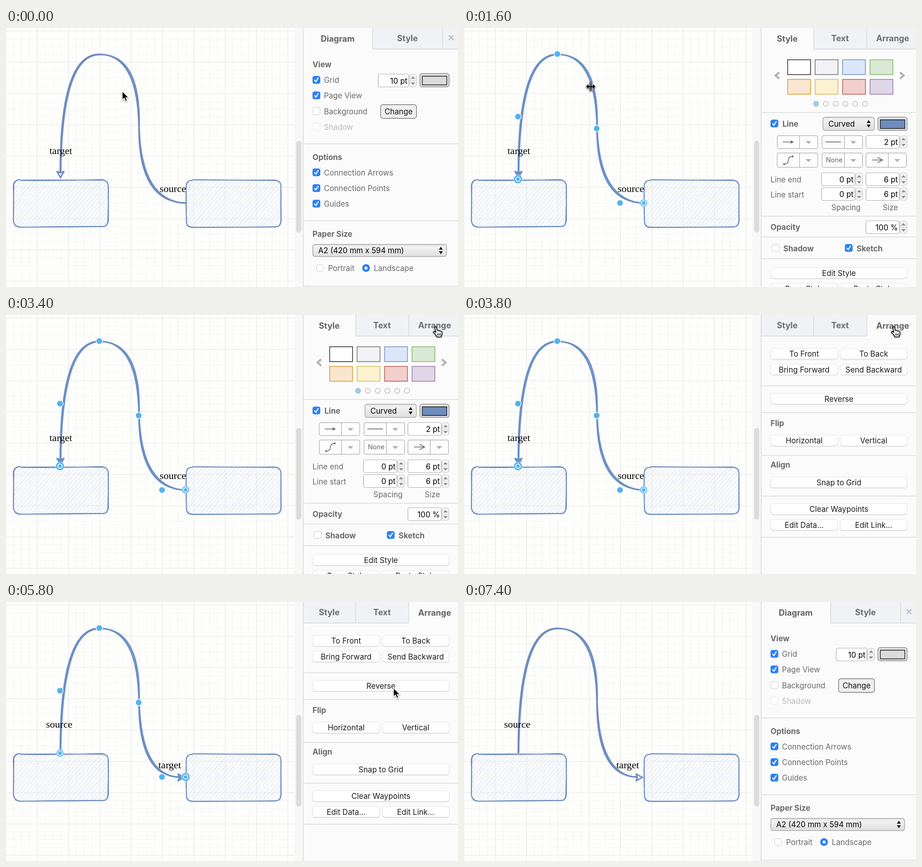
Recreate the animation shown at these times as an HTML page with a canvas. Size 988 px wide and 567 px high, loop 7800 ms.

```html
<!DOCTYPE html>
<html lang="en">
<head>
<meta charset="utf-8">
<title>Reversing a connector</title>
<style>
html, body { margin: 0; width: 100%; height: 100%; overflow: hidden; background: #fbfbfb; }
canvas { display: block; }
</style>
</head>
<body>
<canvas id="stage" width="988" height="567"></canvas>
<script>
const ctx = document.getElementById('stage').getContext('2d');
const LOOP = 7800, TICK = 200;
const SANS = 'Inter, "Noto Sans", sans-serif';
const SERIF = '"Liberation Serif", serif';
const EDGE = '#6e8dbf', HANDLE = '#54b2ee', BLUE = '#2c82f6';
const RULE = '#dadadb', GREY = '#696969';

// Times of the hard changes
const SELECT = 1400, STYLE = 1600, ARRANGE = 3800, REVERSE = 5800, DESELECT = 7400;

// Cursor stops: time, x, y
const STOPS = [[0, 254, 138], [200, 254, 138], [1000, 277, 128], [2400, 277, 128],
  [3400, 943, 27], [4000, 943, 27], [5200, 847, 188], [6000, 847, 188], [7200, 480, 232]];

function random(seed) {
  return () => (seed = seed * 16807 % 2147483647) / 2147483647;
}

// ---------- drawing helpers ----------
function line(color, width, ...pts) {
  ctx.beginPath();
  pts.forEach(([x, y], i) => i ? ctx.lineTo(x, y) : ctx.moveTo(x, y));
  ctx.strokeStyle = color;
  ctx.lineWidth = width;
  ctx.stroke();
}

function shape(fill, stroke, width, pts) {
  ctx.beginPath();
  pts.forEach(([x, y]) => ctx.lineTo(x, y));
  ctx.closePath();
  paint(fill, stroke, width);
}

function paint(fill, stroke, width = 1.3) {
  if (fill) { ctx.fillStyle = fill; ctx.fill(); }
  if (stroke) { ctx.strokeStyle = stroke; ctx.lineWidth = width; ctx.stroke(); }
}

function box(x, y, w, h, r, fill, stroke, width) {
  ctx.beginPath();
  ctx.roundRect(x, y, w, h, r);
  paint(fill, stroke, width);
}

function dot(x, y, r, fill, stroke, width) {
  ctx.beginPath();
  ctx.arc(x, y, r, 0, 7);
  paint(fill, stroke, width);
}

function text(str, x, y, { color = GREY, size = 16.7, bold = false, align = 'left' } = {}) {
  ctx.font = `${bold ? 700 : 400} ${size}px ${SANS}`;
  ctx.textAlign = align;
  ctx.fillStyle = color;
  ctx.fillText(str, x, y + size * 0.363);
}

function serif(str, x, y) {
  ctx.font = `22px ${SERIF}`;
  ctx.textAlign = 'left';
  ctx.fillStyle = '#000';
  ctx.fillText(str, x, y);
}

const title = (str, x, y) => text(str, x, y, { bold: true, color: '#696969', size: 16.9 });
const rule = y => line(RULE, 1.6, [650, y], [988, y]);

// ---------- diagram ----------
function grid() {
  ctx.fillStyle = '#fefefd';
  ctx.fillRect(0, 0, 631, 567);
  const step = 68.5 / 4;
  for (const major of [false, true]) {
    const color = major ? '#ebebe9' : '#f7f7f5';
    for (let i = 0; i < 40; i++) {
      if ((i % 4 === 0) !== major) continue;
      const x = i * step - 0.3, y = 6.5 + (i - 4) * step;
      if (x < 630) line(color, 1.5, [x, 0], [x, 567]);
      line(color, 1.5, [0, y], [630, y]);
    }
  }
  ctx.fillStyle = '#f8f8f9';
  ctx.fillRect(630, 0, 19, 567);
  box(634, 247, 11.5, 201, 5.7, '#dddcdd');
}

function sketchBox(x, y, w, h, seed) {
  const rnd = random(seed), jit = n => (rnd() - 0.5) * n;
  // hatching
  const lean = 0.87, gap = 9.1;
  for (let s = gap; s < w + h * lean; s += gap) {
    const low = Math.max(0, (s - w) / lean), high = Math.min(h, s / lean);
    for (let k = 0; k < 2; k++) {
      line('#d5e3f7', 1, [x + s - low * lean + jit(2), y + low + jit(2)],
        [x + s - high * lean + jit(2), y + high + jit(2)]);
    }
  }
  // double outline
  const r = 14;
  for (let k = 0; k < 2; k++) {
    const X = x + w, Y = y + h, j = () => jit(3);
    ctx.beginPath();
    ctx.moveTo(x + r, y + j());
    ctx.quadraticCurveTo(x + w / 2, y + j() * 1.4, X - r, y + j());
    ctx.quadraticCurveTo(X + j(), y + j(), X + j(), y + r);
    ctx.quadraticCurveTo(X + j() * 1.4, y + h / 2, X + j(), Y - r);
    ctx.quadraticCurveTo(X + j(), Y + j(), X - r, Y + j());
    ctx.quadraticCurveTo(x + w / 2, Y + j() * 1.4, x + r, Y + j());
    ctx.quadraticCurveTo(x + j(), Y + j(), x + j(), Y - r);
    ctx.quadraticCurveTo(x + j() * 1.4, y + h / 2, x + j(), y + r);
    ctx.quadraticCurveTo(x + j(), y + j(), x + r, y + j());
    paint(null, EDGE, 1.9);
  }
}

function connector(reversed, selected) {
  const color = selected ? '#6b90c5' : EDGE;
  const left = reversed ? 331 : 319, right = reversed ? 378 : 393;
  // the second pass bends a little off the first
  for (const d of [0, 1]) {
    ctx.beginPath();
    ctx.moveTo(right, 383 + d * 0.6);
    ctx.quadraticCurveTo(291 + d * 5, 382 - d * 3, 290.5 + d * 0.6, 220);
    ctx.quadraticCurveTo(289 + d * 6, 58 - d * 2, 204, 57.5 + d * 0.8);
    ctx.quadraticCurveTo(118 + d * 4, 57 + d * 2, 118.6 + d, left);
    paint(null, color, 3.2);
  }
  ctx.save();
  if (reversed) { ctx.translate(391, 384); ctx.rotate(-Math.PI / 2); }
  else ctx.translate(119, 329);
  ctx.lineJoin = 'round';
  shape(selected ? color : '#fbfcfe', color, 3, [[0, -1], [-7.5, -15], [0, -12], [7.5, -15]]);
  ctx.restore();
}

function handles(reversed) {
  for (const [x, y] of [[341, 383], [290, 220], [204, 57], [118, 194]]) {
    dot(x, y, 7, HANDLE, '#fff', 1.4);
  }
  for (const [x, y, target] of [[118, 331, !reversed], [392.5, 383, reversed]]) {
    dot(x, y, target ? 9.3 : 8, HANDLE, '#e8f4fd', 0.8);
    dot(x, y, 4.8, null, '#fff', 1.8);
  }
}

function diagram(t) {
  const reversed = t >= REVERSE, selected = t >= SELECT && t < DESELECT;
  grid();
  sketchBox(17, 333, 206, 102.5, 71);
  sketchBox(394, 333, 206, 102.5, 1933);
  connector(reversed, selected);
  if (reversed) {
    serif('source', 87.5, 274.5);
    serif('target', 333, 363.5);
  } else {
    serif('target', 95, 276);
    serif('source', 336, 359);
  }
  if (selected) handles(reversed);
}

// ---------- form controls ----------
function check(x, y, on, faint) {
  box(x + 0.5, y - 8, 16, 16, 3.5, on ? BLUE : '#fff', on ? BLUE : faint ? '#e4e4e4' : '#c9c9c9', 1);
  if (!on) return;
  ctx.lineCap = 'round';
  line('#fff', 2.2, [x + 4.6, y + 0.6], [x + 7.4, y + 3.8], [x + 12.4, y - 4.2]);
  ctx.lineCap = 'butt';
}

function checkRow(str, y, on, faint) {
  check(670, y - 0.5, on, faint);
  text(str, 695, y, { color: faint ? '#b9b9b9' : GREY });
}

function triangle(x, y, w, h, color) {
  shape(color, null, 0, [[x - w, y - h / 2], [x + w, y - h / 2], [x, y + h / 2]]);
}

function field(str, x, y, w) {
  box(x + 0.5, y + 0.5, w - 1, 28, 4, '#fff', '#a9a9a9', 1.2);
  text(str, x + w - 3.5, y + 15, { color: '#000', align: 'right' });
  const sx = x + w + 1.5;
  box(sx, y + 1, 14.5, 27, 4, '#f7f7f7', '#c4c4c4', 1.2);
  line('#c4c4c4', 1, [sx, y + 14.5], [sx + 14.5, y + 14.5]);
  triangle(sx + 7.2, y + 8, 5, -5.5, '#8d8d8d');
  triangle(sx + 7.2, y + 21.5, 5, 5.5, '#8d8d8d');
}

function colorButton(y, color) {
  box(904.7, y + 0.7, 63.8, 29, 5, '#e6e5e6', '#858585', 1.5);
  box(910, y + 6.5, 53.5, 19, 0, color, '#111', 1.4);
}

function select(str, x, y, w, h) {
  const shade = ctx.createLinearGradient(0, y, 0, y + h);
  shade.addColorStop(0, '#d9d9d9');
  shade.addColorStop(0.2, '#f2f2f2');
  shade.addColorStop(1, '#dedede');
  box(x + 0.6, y + 0.6, w - 1.2, h - 1.2, 5, shade, '#9d9d9d', 1.3);
  text(str, x + 12.5, y + h / 2, { color: '#000' });
  const ax = x + w - 13, ay = y + h / 2;
  triangle(ax, ay - 5, 4.2, -6.5, '#111');
  triangle(ax, ay + 5, 4.2, 6.5, '#111');
}

function button(str, x, y, w) {
  ctx.save();
  ctx.shadowColor = 'rgba(0,0,0,.22)';
  ctx.shadowBlur = 2;
  ctx.shadowOffsetY = 1;
  box(x + 0.5, y - 12, w - 1, 23.5, 6, '#fff');
  ctx.restore();
  box(x + 0.5, y - 12, w - 1, 23.5, 6, null, '#e3e3e3', 0.9);
  text(str, x + w / 2, y + 0.3, { color: '#1c1c1c', align: 'center' });
}

const wide = (str, y) => button(str, 670, y, 299);
function pair(a, b, y) {
  button(a, 670, y, 147);
  button(b, 822, y, 147);
}

function split(x, y, h) {
  box(x + 0.6, y + 0.6, 88.6, h - 1.2, 4, '#fdfdfd', '#a9a9a9', 1.2);
  line('#a9a9a9', 1.2, [x + 49.5, y], [x + 49.5, y + h]);
  triangle(x + 69, y + h / 2 + 1, 6.5, 6.5, '#b1b1b1');
}

function tabs(names, edges, active) {
  names.forEach((name, i) => {
    const x = edges[i], w = edges[i + 1] - x, on = i === active;
    if (!on) {
      ctx.fillStyle = '#f1f2f6';
      ctx.fillRect(x, 0, w, 46);
      line('#d6d7db', 1.4, [x, 46.3], [x + w, 46.3]);
    }
    if (i) line('#d6d7db', 1.4, [x + 0.5, 0], [x + 0.5, 46]);
    if (name === '×') {
      line('#b6c0d2', 2.6, [968, 16], [978, 26]);
      line('#b6c0d2', 2.6, [978, 16], [968, 26]);
    } else {
      text(name, x + w / 2 - (x + w > 980 ? -3 : 0), on ? 23 : 22,
        { bold: true, color: on ? '#636363' : '#6d6d6f', size: 18.1, align: 'center' });
    }
  });
}

// ---------- panels ----------
function diagramPanel() {
  tabs(['Diagram', 'Style', '×'], [649, 801, 954, 988], 0);
  title('View', 670, 79.5);
  checkRow('Grid', 114, true);
  checkRow('Page View', 148, true);
  checkRow('Background', 182.5, false);
  checkRow('Shadow', 216.5, false, true);
  field('10 pt', 813, 100.5, 68);
  colorButton(99, '#dddada');
  box(818.7, 167.7, 78.6, 30, 5, '#efefef', '#777', 1.4);
  text('Change', 858, 183, { color: '#111', align: 'center' });
  rule(253.5);
  title('Options', 670, 282.5);
  checkRow('Connection Arrows', 316.5, true);
  checkRow('Connection Points', 351, true);
  checkRow('Guides', 385, true);
  rule(422);
  title('Paper Size', 670, 451);
  select('A2 (420 mm x 594 mm)', 670, 473, 293.5, 28);
  dot(686.5, 525.5, 8, '#fff', '#c6c6c6', 1);
  text('Portrait', 704, 525.5);
  dot(787, 525.5, 8.5, BLUE);
  dot(787, 525.5, 3.2, '#fff');
  text('Landscape', 804, 525.5);
  rule(565);
}

function swatches() {
  const colors = [['#fff', '#222'], ['#f3f3f5', '#6a6a6a'], ['#dbe7f9', '#6c8ebf'], ['#dae8d6', '#82b366'],
    ['#fae6d0', '#d79b20'], ['#fdf2d0', '#d6b656'], ['#f1cfcd', '#b85450'], ['#dfd6e6', '#9673a6']];
  colors.forEach(([fill, stroke], i) => {
    box(707.5 + (i % 4) * 60, i < 4 ? 69.5 : 112.5, 50, 32.5, 0, fill, stroke, 1.5);
  });
  line('#b5b5b5', 4.4, [689, 97], [681, 104], [689, 111]);
  line('#b5b5b5', 4.4, [953, 97], [961, 104], [953, 111]);
  for (let i = 0; i < 6; i++) dot(769.5 + i * 21.4, 166, 5.4, i ? '#fff' : '#8fd3f8', '#a6a6a6', 1.2);
}

function stylePanel() {
  tabs(['Style', 'Text', 'Arrange'], [649, 764, 880, 988], 0);
  swatches();
  rule(185);
  check(670, 209, true);
  title('Line', 696, 209.5);
  select('Curved', 784, 194.5, 113.5, 30.5);
  colorButton(194.5, EDGE);

  split(684, 235, 29.5);
  line('#666', 1.5, [697, 249.5], [715, 249.5]);
  shape('#666', null, 0, [[721, 249.5], [713, 245.5], [715, 249.5], [713, 253.5]]);
  split(782, 235, 29.5);
  line('#555', 1.4, [790, 249.5], [824, 249.5]);
  field('2 pt', 878, 235, 74);

  split(684, 273, 32.5);
  ctx.beginPath();
  ctx.moveTo(699, 298);
  ctx.quadraticCurveTo(709, 298, 709, 289.5);
  ctx.quadraticCurveTo(709, 281, 719, 281);
  paint(null, '#666', 1.6);
  dot(699.5, 298, 2, '#666');
  dot(718.5, 281, 2, '#666');
  split(782, 273, 32.5);
  text('None', 791, 289, { size: 14.4, color: '#666' });
  split(878, 273, 32.5);
  line('#666', 1.5, [892, 289], [915, 289]);
  line('#666', 1.5, [904, 283], [915, 289], [904, 295]);

  text('Line end', 670, 332);
  field('0 pt', 781, 316.5, 74);
  field('6 pt', 878, 316.5, 74);
  text('Line start', 670, 365);
  field('0 pt', 781, 349, 74);
  field('6 pt', 878, 349, 74);
  text('Spacing', 835, 392.5, { align: 'center' });
  text('Size', 932, 392.5, { align: 'center' });
  rule(412);
  title('Opacity', 670, 435.5);
  field('100 %', 878, 421.5, 74);
  rule(457.5);
  check(672.5, 481.5, false);
  title('Shadow', 698, 482.5);
  check(832.5, 481.5, true);
  title('Sketch', 858, 482.5);
  rule(505);
  wide('Edit Style', 536.5);
  pair('Copy Style', 'Paste Style', 571);
}

function arrangePanel() {
  tabs(['Style', 'Text', 'Arrange'], [649, 764, 880, 988], 2);
  pair('To Front', 'To Back', 85);
  pair('Bring Forward', 'Send Backward', 119.5);
  rule(155);
  wide('Reverse', 183.5);
  rule(213.5);
  title('Flip', 670, 237);
  pair('Horizontal', 'Vertical', 275);
  rule(307.5);
  title('Align', 670, 328);
  wide('Snap to Grid', 366.5);
  rule(396.5);
  wide('Clear Waypoints', 425);
  pair('Edit Data...', 'Edit Link...', 459.5);
  rule(486.5);
}

function panel(t) {
  ctx.fillStyle = '#fbfbfb';
  ctx.fillRect(649, 0, 339, 567);
  if (t < STYLE || t >= DESELECT) diagramPanel();
  else if (t < ARRANGE) stylePanel();
  else arrangePanel();
  line('#d6d6d8', 1.5, [649.5, 0], [649.5, 567]);
}

// ---------- cursor ----------
function cursorAt(t) {
  const i = STOPS.findIndex(s => s[0] > t);
  if (i < 0) return STOPS[STOPS.length - 1].slice(1);
  const [t0, x0, y0] = STOPS[i - 1], [t1, x1, y1] = STOPS[i];
  const p = (t - t0) / (t1 - t0), e = p * p * (3 - 2 * p);
  return [x0 + (x1 - x0) * e, y0 + (y1 - y0) * e];
}

function arrowCursor() {
  shape('#000', '#fff', 1.5, [[0, 0], [0, 19.5], [4.4, 15.6], [7.6, 22.8], [11, 21.3], [8, 14.4], [13.8, 14.2]]);
}

function resizeCursor() {
  for (const [color, grow] of [['#fff', 2.4], ['#000', 0]]) {
    for (const s of [-1, 1]) {
      shape(color, color, 0.6 + grow, [[s * 10, 0], [s * 5, -4.5], [s * 5, 4.5]]);
      line(color, 1.5 + grow, [s * 1.5, -10], [s * 1.5, 10]);
    }
    line(color, 2 + grow, [-7, 0], [7, 0]);
  }
}

function handCursor() {
  ctx.lineJoin = 'round';
  shape('#fff', '#111', 1.6, [[-6, 0], [-4, -2], [-2, 0], [0, 7], [2, 6], [4, 8], [6, 7], [8, 9],
    [10, 9.5], [10.5, 14], [8, 21], [-1, 21], [-4, 16], [-9, 11], [-7.5, 8.5], [-3.5, 11]]);
  for (const x of [0.5, 3.5, 6.5]) line('#111', 1.2, [x, 13], [x + 0.2, 18]);
  ctx.lineJoin = 'miter';
}

function cursor(t) {
  if (t >= DESELECT) return;
  const [x, y] = cursorAt(t);
  ctx.save();
  ctx.translate(x, y);
  ctx.shadowColor = 'rgba(0,0,0,.3)';
  ctx.shadowBlur = 3;
  ctx.shadowOffsetY = 1.5;
  if (t >= 1000 && t <= 2400) resizeCursor();
  else if (x > 649 && y < 46) handCursor();
  else arrowCursor();
  ctx.restore();
}

function frame(now) {
  const t = Math.floor(now % LOOP / TICK) * TICK;
  diagram(t);
  panel(t);
  cursor(t);
  requestAnimationFrame(() => frame(performance.now() - start));
}

const start = performance.now();
frame(0);
</script>
</body>
</html>
```
